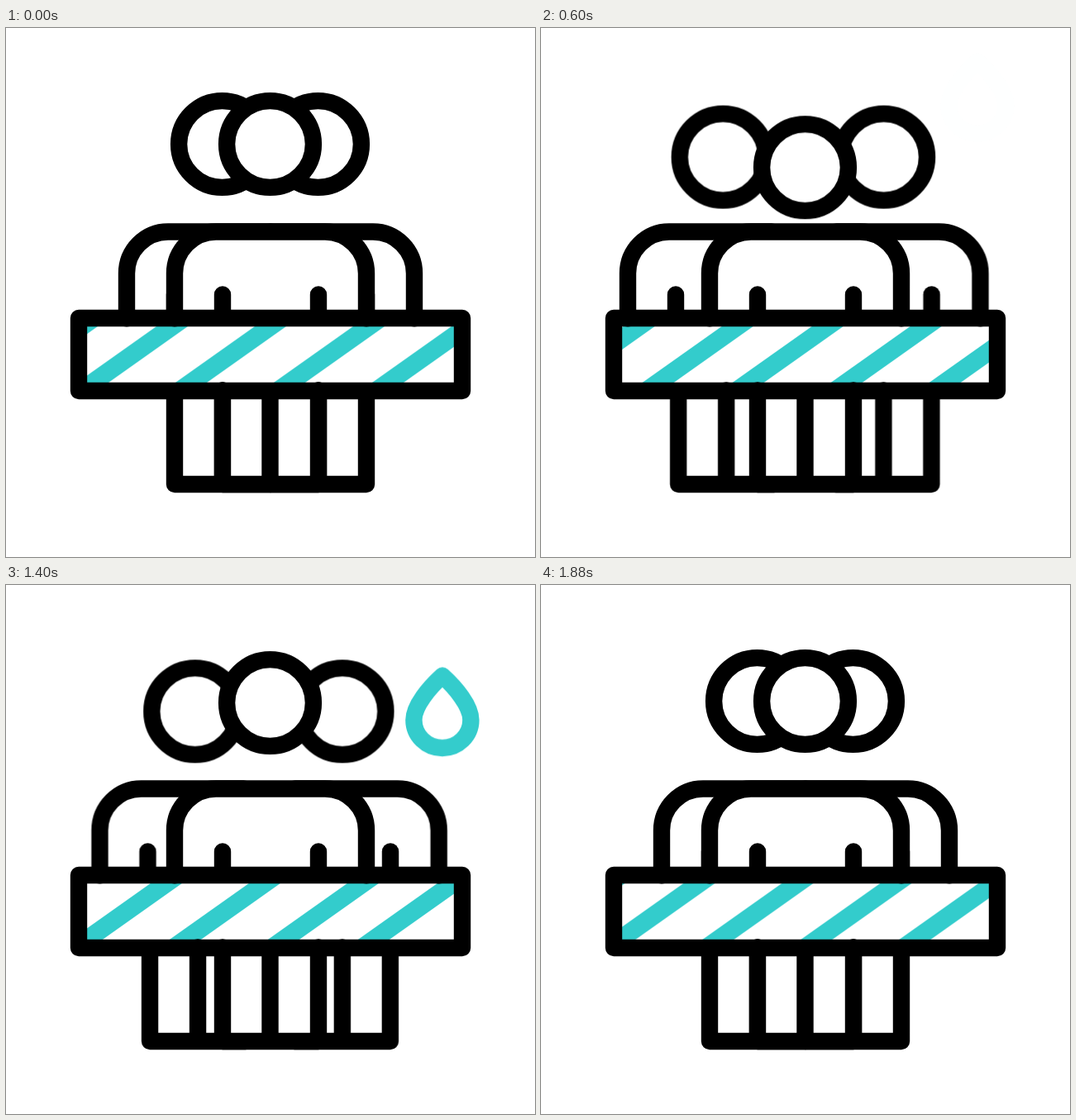
Write an HTML page that moves like this. It is 640 px wide and 640 px high and loops after 1920 ms.

```html
<!DOCTYPE html>
<html lang="en">
<head>
<meta charset="utf-8">
<title>Queue behind the barrier</title>
<style>
  html, body { margin: 0; height: 100%; overflow: hidden; background: #fff; }
  svg { display: block; width: 100vw; height: 100vh; }

  .ink { fill: #fff; stroke: #000; stroke-width: 20.4; stroke-linecap: round; stroke-linejoin: round; }
  .dots { stroke-width: 21; }

  .side, .nod, .stripes, .drop { animation: 1920ms linear infinite; }
  .side { animation-name: spread; }
  .nod { animation-name: nod; }
  .stripes { animation-name: slide; fill: #33cccc; }
  .drop { animation-name: fall, fade; fill: none; stroke: #33cccc; stroke-width: 20.4; stroke-linejoin: round; }

  /* people at the sides step out and back */
  @keyframes spread {
    0%, 4.69% { transform: none; animation-timing-function: cubic-bezier(.333, 0, .667, 1); }
    35.68% { transform: translate(var(--x), var(--y, 0px)); }
    62.76% { transform: translate(var(--x), var(--y, 0px)); animation-timing-function: cubic-bezier(.333, 0, .667, 1); }
    94.01%, 100% { transform: none; }
  }
  @keyframes nod {
    0% { transform: none; animation-timing-function: cubic-bezier(.333, 0, .667, 1); }
    31.25% { transform: translateY(28.2px); }
    46.875% { transform: translateY(28.2px); animation-timing-function: cubic-bezier(.333, 0, .667, 1); }
    78.125%, 100% { transform: none; }
  }
  @keyframes slide {
    to { transform: translateX(466px); }
  }
  @keyframes fall {
    0%, 31.25% { transform: translateY(-24.3px); }
    85.417%, 100% { transform: translateY(66px); }
  }
  @keyframes fade {
    0%, 31.25%, 85.417%, 100% { opacity: 0; }
    43.75%, 72.917% { opacity: 1; }
  }
</style>
</head>
<body>
<svg viewBox="0 0 640 640">
  <defs>
    <clipPath id="window"><rect x="88" y="351" width="464" height="88"/></clipPath>
    <path id="stripe" d="M80.1 433l107.3-76h38l-107.3 76z"/>
    <g id="set">
      <use href="#stripe"/>
      <use href="#stripe" x="119"/>
      <use href="#stripe" x="238"/>
      <use href="#stripe" x="357"/>
    </g>
  </defs>

  <!-- side people -->
  <g class="ink">
    <circle class="side" style="--x:-43.7px;--y:16.5px" cx="261.5" cy="140.5" r="52.4"/>
    <circle class="side" style="--x:39.3px;--y:16.5px" cx="377.5" cy="140.5" r="52.4"/>
    <path class="side" style="--x:-43.4px" d="M146 351V297A50 50.5 0 0 1 196 246.5H320M204 322.5V351"/>
    <path class="side" style="--x:39.6px" d="M494 351V297A50 50.5 0 0 0 444 246.5H320"/>
    <path class="side" style="--x:38.7px" d="M436 322.5V351"/>
    <path class="side" style="--x:-40px" d="M204 439V552H320M262 439V552"/>
    <path class="side" style="--x:38.5px" d="M436 439V552H320M378 439V552"/>
  </g>

  <!-- front person -->
  <g class="ink">
    <circle class="nod" cx="319.5" cy="140.5" r="52.4"/>
    <path d="M204 351V297A50 50.5 0 0 1 254 246.5H386A50 50.5 0 0 1 436 297V351M262 322.5V351M378 322.5V351"/>
    <path d="M262 439V552H378V439M319.5 439V552"/>
  </g>

  <!-- barrier -->
  <rect x="88" y="351" width="464" height="88" fill="#fff"/>
  <g clip-path="url(#window)">
    <g class="stripes">
      <use href="#set"/>
      <use href="#set" x="-466"/>
      <use href="#set" x="-932"/>
    </g>
  </g>
  <rect class="ink" style="fill:none" x="88" y="351" width="464" height="88"/>

  <!-- round line ends on the barrier -->
  <g class="ink dots">
    <path d="M204 351h.01M436 351h.01M262 438.7h.01M378 438.7h.01"/>
    <path class="side" style="--x:-43.4px" d="M146 351h.01"/>
    <path class="side" style="--x:39.6px" d="M494 351h.01"/>
    <path class="side" style="--x:-40px" d="M262 438.7h.01"/>
    <path class="side" style="--x:38.5px" d="M378 438.7h.01"/>
  </g>

  <path class="drop" d="M528 64.5C512 79 493.4 101 493.4 118A34.5 34 0 0 0 562.4 118C562.4 101 544 79 528 64.5Z"/>
</svg>
</body>
</html>
```
